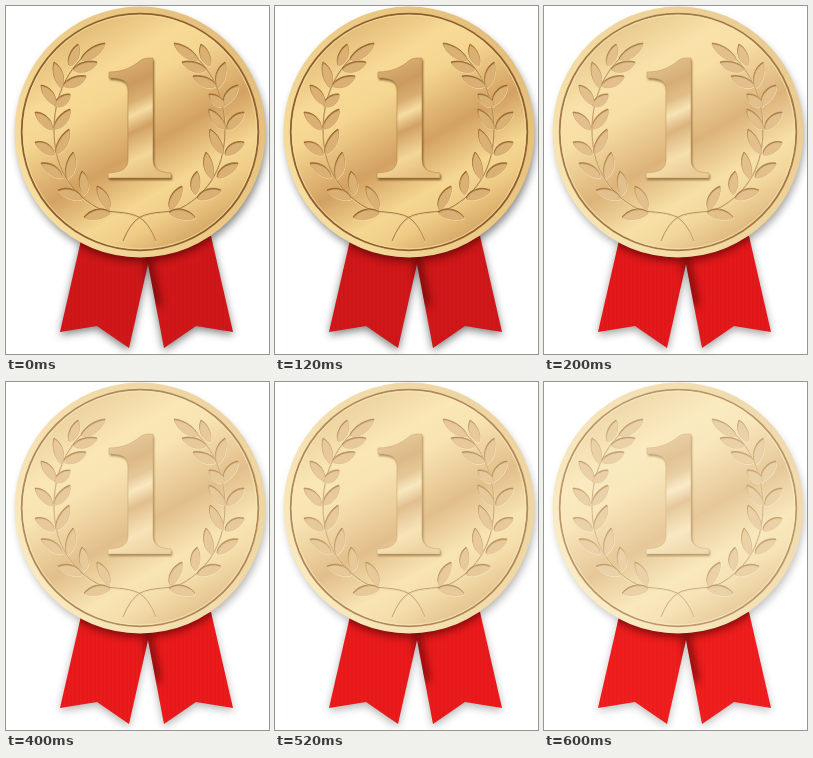
Write an HTML page that moves like this. It is 263 px wide and 348 px high and loops after 0.8 s.

```html
<!DOCTYPE html>
<html lang="en">
<head>
<meta charset="utf-8">
<title>Gold medal</title>
<style>
html, body { margin: 0; width: 100%; height: 100%; overflow: hidden; background: #fff; }
svg { display: block; width: 100vw; height: 100vh; }
</style>
</head>
<body>
<svg viewBox="0 0 263 348">
  <defs>
    <linearGradient id="face" gradientUnits="userSpaceOnUse" x1="75" y1="24" x2="193" y2="228">
      <stop offset="0" stop-color="#e3bd78"/>
      <stop offset=".2" stop-color="#f8da96"/>
      <stop offset=".32" stop-color="#f5d691"/>
      <stop offset=".57" stop-color="#d3a161"/>
      <stop offset=".76" stop-color="#f5d792"/>
      <stop offset=".86" stop-color="#efcd87"/>
      <stop offset="1" stop-color="#d6a866"/>
    </linearGradient>
    <linearGradient id="rim" x1="0" y1=".8" x2="1" y2=".2">
      <stop offset="0" stop-color="#f8e0a2"/>
      <stop offset=".5" stop-color="#eccb87"/>
      <stop offset="1" stop-color="#e3bd79"/>
    </linearGradient>
    <linearGradient id="digit" gradientUnits="userSpaceOnUse" x1="112" y1="56" x2="161" y2="161">
      <stop offset="0" stop-color="#dcb276"/>
      <stop offset=".22" stop-color="#cb9a5e"/>
      <stop offset=".36" stop-color="#d9ae70"/>
      <stop offset=".47" stop-color="#f6dca2"/>
      <stop offset=".6" stop-color="#d2a164"/>
      <stop offset=".82" stop-color="#f3d698"/>
      <stop offset="1" stop-color="#e4be7e"/>
    </linearGradient>
    <pattern id="weave" width="4" height="4" patternUnits="userSpaceOnUse">
      <path d="M1 0V4" stroke="#a00" stroke-opacity=".12"/>
    </pattern>
    <filter id="blur" x="-20%" y="-20%" width="140%" height="140%"><feGaussianBlur stdDeviation="4.5"/></filter>
    <filter id="soft" x="-20%" y="-20%" width="140%" height="140%"><feGaussianBlur stdDeviation="1.3"/></filter>
    <filter id="glow" color-interpolation-filters="sRGB">
      <feComponentTransfer>
        <feFuncR type="gamma"/><feFuncG type="gamma"/><feFuncB type="gamma"/>
      </feComponentTransfer>
    </filter>
    <path id="tails" d="M76 230L54 326L91 320L123 342L142 258L158 342L190 320L227 326L205 230Z"/>
    <clipPath id="onTails"><use href="#tails"/></clipPath>
    <path id="one" d="M103 66C117 66 127 61 135 54Q138 52 142 52H147V153C147 163 152 166 165 167V172H102V167C116 166 122 163 122 153V84C122 74 115 72 103 72Z"/>
    <g id="branch">
      <path fill="none" d="M76 52C56 72 48 98 48 124C48 158 62 186 92 202C104 208 119 204 133 211Q143 217 150 235"/>
    </g>
    <g id="laurel">
      <use href="#branch"/><use href="#branch" transform="matrix(-1 0 0 1 267 0)"/>
    </g>
  </defs>

  <g class="shadow" filter="url(#blur)">
    <use href="#tails" y="3"/>
    <circle cx="136" cy="131" r="124"/>
  </g>
  <g id="ribbon">
    <use href="#tails"/>
    <use href="#tails" fill="url(#weave)"/>
    <g clip-path="url(#onTails)">
      <g filter="url(#blur)" opacity=".6">
        <circle cx="134" cy="128" r="127" fill="#300"/>
        <path d="M141 250L151 300" stroke="#300" stroke-width="8"/>
      </g>
    </g>
  </g>
  <g filter="url(#glow)">
    <circle cx="134" cy="126" r="125.5" fill="url(#rim)"/>
    <circle cx="134" cy="126" r="118.3" fill="url(#face)" stroke="#8f602f" stroke-width="1.8"/>
    <circle cx="134" cy="126" r="116.7" fill="none" stroke="#f3dba0" stroke-width=".8"/>
    <g stroke-linejoin="round">
      <use href="#laurel" x=".6" y="1.6" fill="#f8e2ab" stroke="#f8e2ab"/>
      <use href="#laurel" fill="#94652f" stroke="#94652f" stroke-width=".8"/>
      <use href="#laurel" x=".4" y="1.2" fill="#dbb073" stroke="#cfa064" stroke-width=".5"/>
    </g>
    <use href="#one" x="1" y="2" fill="#5c3510" opacity=".75" filter="url(#soft)"/>
    <use href="#one" fill="url(#digit)" stroke="#b98a4c" stroke-width=".6"/>
  </g>
</svg>
<script>
const $ = query => document.querySelector(query);

// Each leaf: base x, y and tip x, y
const leaves = [
  [75, 53, 99, 37], [63, 59, 72, 38], [55, 81, 48, 56], [67, 63, 91, 56], [57, 79, 80, 70],
  [49, 98, 35, 79], [48, 99, 64, 88], [46, 123, 29, 106], [48, 122, 64, 103],
  [48, 148, 29, 136], [50, 147, 63, 123], [56, 171, 35, 157], [61, 172, 67, 146],
  [76, 192, 52, 184], [78, 188, 76, 165], [104, 206, 78, 211], [103, 203, 91, 180]
];
const leafPath = ([x, y, u, v]) => {
  const dx = u - x, dy = v - y, k = 7 / Math.hypot(dx, dy);
  const side = s => [.2, .72].map(t => `${x + dx * t - dy * k * s} ${y + dy * t + dx * k * s}`);
  const [a, b] = side(1), [c, d] = side(-.7);
  return `M${x} ${y}C${a} ${b} ${u} ${v}C${d} ${c} ${x} ${y}`;
};
const foliage = document.createElementNS('http://www.w3.org/2000/svg', 'path');
foliage.setAttribute('d', leaves.map(leafPath).join(''));
$('#branch').append(foliage);

const steps = [
  { gamma: 1, red: '#d01719', shadow: .5 },
  { gamma: .76, red: '#e4191b', shadow: .38 },
  { gamma: .63, red: '#eb1b1c', shadow: .3 },
  { gamma: .53, red: '#f01e1e', shadow: .25 }
];
const channels = document.querySelectorAll('#glow [type=gamma]');
const start = performance.now();
let shown;

function tick() {
  const step = steps[Math.floor((performance.now() - start) % 800 / 200)];
  if (step !== shown) {
    shown = step;
    channels.forEach(c => c.setAttribute('exponent', step.gamma));
    $('#ribbon').setAttribute('fill', step.red);
    $('.shadow').setAttribute('opacity', step.shadow);
  }
  requestAnimationFrame(tick);
}
tick();
</script>
</body>
</html>
```
